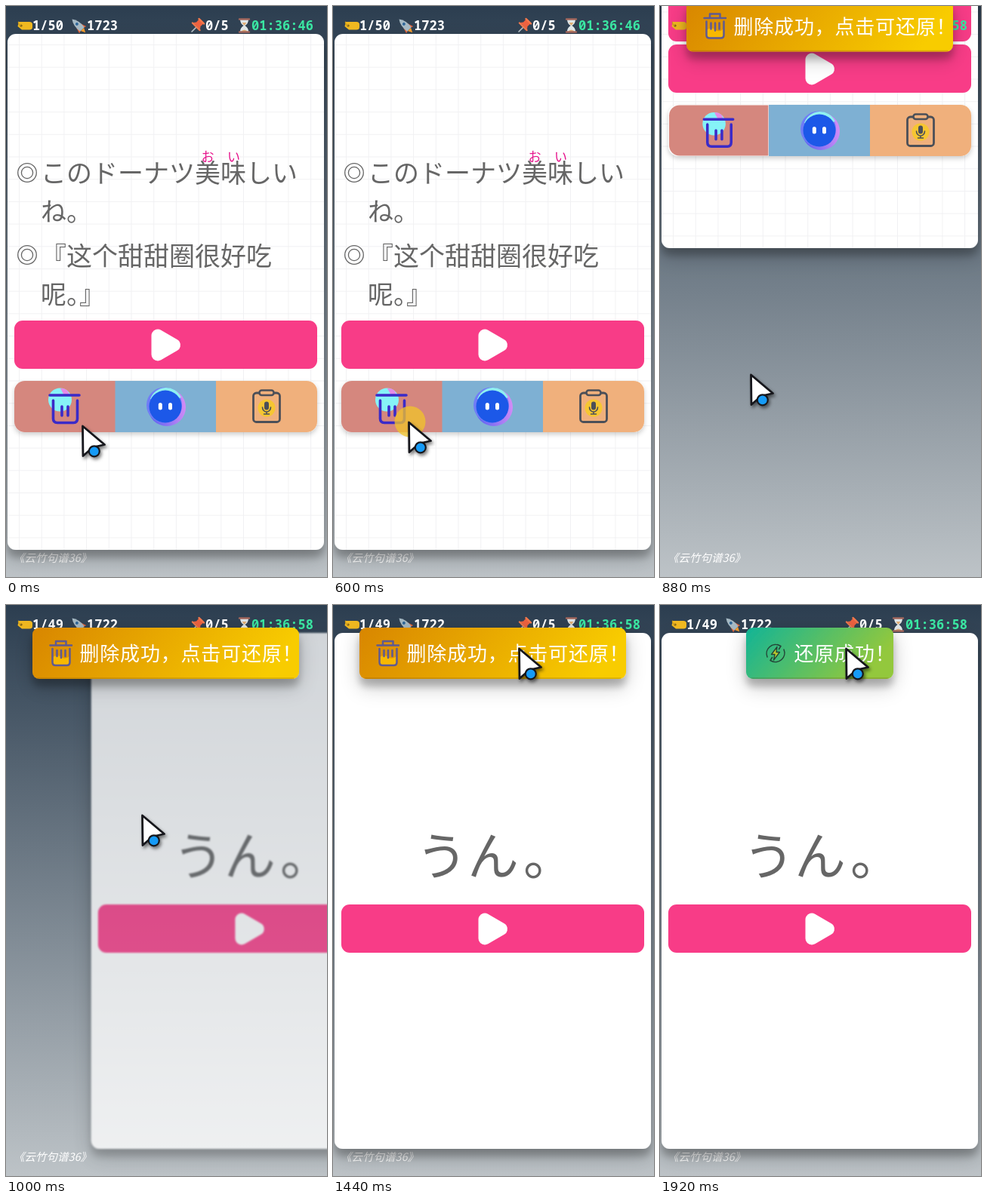
Write an HTML page that moves like this. It is 425 px wide and 757 px high and loops after 2480 ms.

```html
<!DOCTYPE html>
<html lang="zh-CN">
<head>
<meta charset="utf-8">
<title>Flashcards</title>
<style>
  html, body { margin: 0; width: 100%; height: 100%; overflow: hidden; background: #2c3e50; }
  svg { display: block; width: 100vw; height: 100vh; }
  text { white-space: pre; }
  .mono { font: 600 17.1px "Noto Sans Mono", "DejaVu Sans Mono", monospace; fill: #fff; }
  .ja { font-family: "Noto Sans CJK JP", "Noto Sans CJK SC", sans-serif; fill: #666; }
  .zh { font-family: "Noto Sans CJK SC", "Noto Sans CJK JP", sans-serif; fill: #666; }
  .line { font-size: 34px; }
  .ruby { font-size: 17px; fill: #e6148c; }
  .toast { font-size: 26px; font-weight: 500; letter-spacing: .8px; fill: #fff; }
  .title { font-size: 14.5px; font-weight: 500; font-style: italic; fill: #fff; }
  .pen { fill: none; stroke-linecap: round; stroke-linejoin: round; }
</style>
</head>
<body>
<svg id="stage" viewBox="0 0 425 757" preserveAspectRatio="none"></svg>
<script>
const LOOP = 2480;
const STEPS = [0, 80, 120, 600, 680, 760, 800, 880, 960, 1000, 1080, 1120,
  1200, 1400, 1440, 1720, 1800, 1880, 1920];
// Pointer tip: time, x, y
const POINTER = [[0, 101, 556], [80, 101, 553], [120, 100, 551], [800, 100, 548],
  [880, 120, 488], [960, 160, 352], [1000, 180, 278], [1080, 225, 124],
  [1120, 230, 89], [1200, 226, 88], [1400, 236, 72], [1440, 246, 57]];

const rect = (x, y, w, h, r, fill, more = '') =>
  `<rect x="${x}" y="${y}" width="${w}" height="${h}" rx="${r}" fill="${fill}" ${more}/>`;
const circle = (x, y, r, fill, more = '') =>
  `<circle cx="${x}" cy="${y}" r="${r}" fill="${fill}" ${more}/>`;
const path = (d, fill, more = '') => `<path d="${d}" fill="${fill}" ${more}/>`;
const pen = (d, color, width) =>
  `<path class="pen" d="${d}" stroke="${color}" stroke-width="${width}"/>`;
const text = (x, y, cls, str, id = '') =>
  `<text x="${x}" y="${y}" class="${cls}" ${id && `id="${id}"`}>${str}</text>`;
const group = (id, body, more = '') => `<g id="${id}" ${more}>${body}</g>`;
const gradient = (id, from, to, dir) => `<linearGradient id="${id}" ${dir}>
  <stop stop-color="${from}"/><stop offset="1" stop-color="${to}"/></linearGradient>`;

const defs = `<defs>
  ${gradient('sky', '#2c3e50', '#bdc3c7', 'x2="0" y2="1"')}
  ${gradient('amber', '#d88600', '#f8cc00', 'x2="1" y2=".15"')}
  ${gradient('mint', '#12b496', '#93c83c', 'x2="1" y2=".3"')}
  ${gradient('halo', '#5a62f0', '#d58cf6', 'y1=".6" x2="1" y2=".4"')}
  <filter id="lift" x="-20%" y="-60%" width="140%" height="260%">
    <feDropShadow dx="0" dy="10" stdDeviation="5" flood-opacity=".2"/>
    <feDropShadow dx="0" dy="8" stdDeviation="12" flood-opacity=".24"/>
  </filter>
  <filter id="cardLift" x="-15%" y="-8%" width="130%" height="120%">
    <feDropShadow dx="0" dy="10" stdDeviation="5" flood-opacity=".2"/>
    <feDropShadow dx="0" dy="8" stdDeviation="13" flood-opacity=".24"/>
  </filter>
  <filter id="soft" x="-10%" y="-30%" width="120%" height="180%">
    <feDropShadow dx="0" dy="3" stdDeviation="3" flood-opacity=".2"/>
  </filter>
  <filter id="near" x="-40%" y="-40%" width="200%" height="200%">
    <feDropShadow dx="2" dy="3" stdDeviation="2" flood-opacity=".5"/>
  </filter>
  <pattern id="grid" width="29.7" height="29.7" x="17" y="51" patternUnits="userSpaceOnUse">
    <path d="M0 .5H29.7M.5 0V29.7" stroke="#f1f1f3" fill="none"/>
  </pattern>
</defs>`;

const sheet = rect(2, 37, 419, 684, 11, '#fff', 'filter="url(#cardLift)"');
const play = (id, y) => group(id, rect(11, y, 401, 64, 11, '#f83c87') +
  `<path d="M201 ${y + 20}v25l21.5-12.5z" fill="#fff" stroke="#fff" stroke-width="17" stroke-linejoin="round"/>`);
const bullet = y => ['12.3', '7.6'].map(r =>
  circle(28, y, r, 'none', 'stroke="#666" stroke-width="1.3"')).join('');

const words = bullet(221) + bullet(330) +
  text(46, 234, 'ja line', 'このドーナツ美味しい') +
  text(46, 285, 'ja line', 'ね。') +
  text(46, 344, 'zh line', '『这个甜甜圈很好吃') +
  text(46, 395, 'zh line', '呢。』') +
  text(258.5, 206, 'ja ruby', 'お') + text(293, 206, 'ja ruby', 'い');

const INDIGO = '#3a2cc8', SLATE = '#4c5058';
const binButton = group('bin',
  path('M144.5 497H25a14 14 0 0 0-14 14v40a14 14 0 0 0 14 14h119.5z', '#d5877e') +
  circle(71.5, 522, 15.5, '#86f3f7') +
  path('M72 507q10-1 12 9l-7 0z', '#e48ae8') +
  pen('M58 516H97M62.5 523V547q0 5.500 5.500 5.500H89.500q5 0 5-5.500V523M74 531V543M82 531V543', INDIGO, 3.6));
const faceButton = rect(144, 497, 134, 68, 0, '#7eb0d3') +
  circle(213, 532, 25, 'url(#halo)') + circle(209.5, 529, 23.5, '#6f7cf6') +
  path('M191 521a22 22 0 0 1 41-2l-20 6z', '#8ff0f0') +
  circle(211, 531, 21.5, '#1b59e8') +
  rect(201.800, 526, 5, 9.500, 2.500, '#fff') + rect(215, 526, 5, 9.500, 2.500, '#fff');
const noteButton = path('M278 497H398a14 14 0 0 1 14 14v40a14 14 0 0 1-14 14H278z', '#f0b07b') +
  rect(327.500, 513, 35, 38.500, 4, 'none', `stroke="${SLATE}" stroke-width="2.8"`) +
  rect(335.500, 509.500, 19, 6.500, 3, '#f0b07b', `stroke="${SLATE}" stroke-width="2.6"`) +
  circle(345, 533, 11.5, '#f6c632') +
  rect(342, 524.500, 6, 11, 3, SLATE) +
  pen('M339.500 532a5.500 6 0 0 0 11 0M345 538.500V541M341.500 541H348.500', SLATE, 1.6);

const oldCard = group('oldCard', sheet + rect(2, 37, 419, 684, 11, 'url(#grid)') +
  group('upper', words + play('playA', 417)) +
  group('lower', play('playB', 417) +
    `<g filter="url(#soft)">${rect(11, 497, 401, 68, 14, '#fff')}${faceButton}${noteButton}${binButton}</g>`));

const newCard = group('newCard', sheet +
  `<text class="ja" x="110 178 252" y="358" font-size="68">うん。</text>` + play('playC', 397));

const tag = path('M17 21H31q4 0 4 3.500V28q0 3.500-4 3.500H21L15.500 27z', '#f0b820') +
  circle(20, 26, 1.6, '#6d5314') + pen('M20 26q-4-1-3.500-5', '#c99a1c', 1.2);
const rocket = `<g transform="translate(96 26) rotate(-45)">
  ${path('M-3 7L0 13 3 7z', '#f59b2c')}${path('M-6.500 8L-4 0H4L6.500 8 0 6z', '#e0633a')}
  ${path('M0-12Q5.500-5 4 7H-4Q-5.500-5 0-12z', '#a5b9c4')}${circle(0, -3, 2, '#31689a')}</g>`;
const pin = pen('M252 28L246 34', '#b9c2c8', 1.6) +
  path('M248 22L257 31 257.500 27 262.500 22.500 256.500 16.500 252 21.500z', '#ee6240') +
  pen('M247 22.500L256.500 32M255.500 17L262 23.500', '#f4794c', 2.4);
const glass = path('M310 18H321Q321 23 316.500 26 321 29 321 34H310Q310 29 314.500 26 310 23 310 18z', '#dfe6e8') +
  path('M312.500 22H318.500L315.500 26zM311 34q4.500-5 9 0z', '#e0ac72') +
  pen('M309 17.500H322M309 34.500H322', '#a2665c', 2.4);
const header = tag + rocket + pin + glass +
  text(35, 32, 'mono', '1/50', 'page') + text(107, 32, 'mono', '1723', 'total') +
  text(264, 32, 'mono', '0/5') +
  `<text x="325" y="32" class="mono" id="clock" style="fill:#3ae6a2">01:36:46</text>`;

const panel = (x, w, fill) => rect(x, 30, w, 68, 9, fill, 'filter="url(#lift)"') +
  pen(`M${x + 7} 97H${x + w - 7}`, 'rgba(90,60,0,.22)', 1.6);
const deleted = group('deleted', panel(35, 353, 'url(#amber)') +
  path('M62 69q6-4 11 0t11-1V77q0 3-3 3H65q-3 0-3-3z', '#f8b800') +
  pen('M58.500 53.500H87M66 53V48H79.500V53M61.500 58V76q0 4 4 4H80.500q4 0 4-4V58M67.500 60V68M73 60V70M78.500 60V68', '#5f5a92', 2.5) +
  text(97.500, 74, 'zh toast', '删除成功，点击可还原！'));
const restored = group('restored', panel(114, 195, 'url(#mint)') +
  pen('M142 69A12 12 0 0 1 159 54M155.500 52.500L160 54.500 157.500 58.500M164 59A12 12 0 0 1 147 74M150.500 75.500L146 73.500 148.500 69.500', '#234437', 1.5) +
  path('M155 55.500L147.500 65.500H152L150.500 73 158.500 62.500H154z', '#b9c92e', 'stroke="#234437" stroke-width="1.3" stroke-linejoin="round"') +
  text(177.500, 74, 'zh toast', '还原成功！'));

const pointer = group('pointer',
  path('M.5 1L29.500 25.500 14 29 1 40.500z', '#fff', 'stroke="#17191c" stroke-width="2.8" stroke-linejoin="round"') +
  circle(15.8, 34.3, 7, '#169bf7', 'stroke="#17191c" stroke-width="2.2"'), 'filter="url(#near)"');

const stage = document.getElementById('stage');
stage.innerHTML = defs + rect(0, 0, 425, 757, 0, 'url(#sky)') +
  text(10, 737, 'zh title', '《云竹句谱36》') +
  oldCard + newCard + header + deleted + restored +
  circle(102, 551, 20.5, '#f2c528', 'id="tap"') + pointer;

const el = {};
stage.querySelectorAll('[id]').forEach(n => el[n.id] = n);
const lastBefore = (list, t, key) => list.filter(v => key(v) <= t).pop();
const move = (n, x, y) => n.setAttribute('transform', `translate(${x} ${y})`);
const fade = (n, a) => {
  n.style.display = a > 0 ? '' : 'none';
  n.setAttribute('opacity', Math.min(1, a));
};

function draw(time) {
  const t = lastBefore(STEPS, time, v => v);
  const removed = t >= 760;

  // Old card accelerates upward while an extra button spreads its content
  const rise = Math.max(0, (t - 680) / 280);
  const spread = removed ? 34 : 0;
  move(el.oldCard, 0, -784 * rise * rise);
  move(el.upper, 0, -spread);
  move(el.lower, 0, spread);
  fade(el.oldCard, t < 960 ? 1 : 0);
  fade(el.playB, removed ? 1 : 0);
  el.bin.setAttribute('transform', t >= 680
    ? 'translate(78 531) scale(.984) translate(-78 -531)' : '');

  // New card decelerates in from the right
  const left = Math.max(0, 1120 - t);
  const slide = left * left * .0077;
  move(el.newCard, slide, 0);
  fade(el.newCard, t >= 960 ? 1 - slide / 500 : 0);
  el.newCard.style.filter = slide > 50 ? 'blur(1.1px)' : 'none';

  el.page.textContent = removed ? '1/49' : '1/50';
  el.total.textContent = removed ? '1722' : '1723';
  el.clock.textContent = removed ? '01:36:58' : '01:36:46';

  const drop = Math.max(0, (1000 - t) / 200);
  const swap = Math.max(0, Math.min(1, (t - 1660) / 260));
  move(el.deleted, 0, -104 * drop * drop);
  fade(el.deleted, t >= 800 ? 1 - swap * 1.4 : 0);
  fade(el.restored, (swap - .3) / .7);

  const [, x, y] = lastBefore(POINTER, t, p => p[0]);
  move(el.pointer, x, y);
  fade(el.tap, t === 600 ? .75 : t === 680 ? .35 : 0);
}

const start = performance.now();
function tick() {
  draw((performance.now() - start) % LOOP);
  requestAnimationFrame(tick);
}
tick();
</script>
</body>
</html>
```
